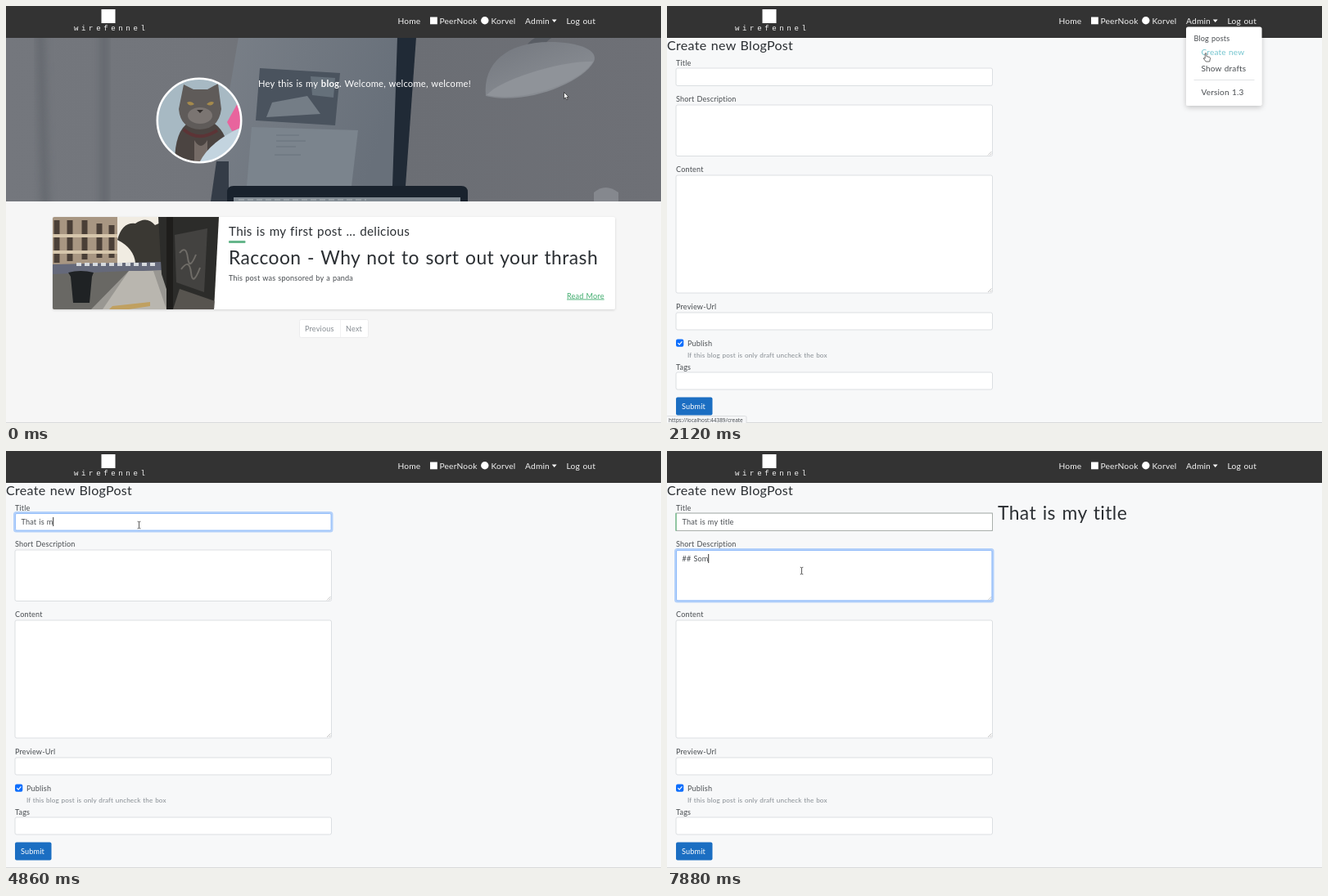
These frames come from a looping animation (800 px wide and 510 px high, 8 s). An HTML page:

```html
<!DOCTYPE html>
<html lang="en">
<head>
<meta charset="utf-8">
<title>Blog admin</title>
<style>
  html, body { margin: 0; width: 100%; height: 100%; overflow: hidden; background: #f7f8f9; }
  svg { display: block; width: 800px; height: 510px; }
  text { font: 9.1px Lato, sans-serif; letter-spacing: .019em; word-spacing: .06em; fill: #484c50; }
  .nav text { font-size: 10.2px; fill: #f4f4f4; }
  .nav .brand { font: 9px "Liberation Mono", monospace; letter-spacing: 3.65px; }
  .lead { font-size: 11.2px; fill: #fff; }
  .h1 { font-size: 22.8px; fill: #2b2f33; }
  .h3 { font-size: 16px; fill: #2b2f33; }
  .sub { font-size: 15.2px; fill: #2b2f33; }
  .item { font-size: 10px; }
  .muted { fill: #868c92; }
  .small { font-size: 8.1px; }
  .more { fill: #43ad70; text-decoration: underline; }
  .on { fill: #fff; }
  .url { font: 6.45px "Noto Sans", sans-serif; letter-spacing: 0; word-spacing: 0; }
  .field { fill: #fff; stroke: #d3d7db; stroke-width: .8; }
  .ring { fill: none; stroke: #b4d1fa; stroke-width: 3; }
  .focus { stroke: #86b5fa; stroke-width: .8; }
  .grip { stroke: #9a9a9a; stroke-width: .6; fill: none; }
</style>
</head>
<body>
<svg viewBox="0 0 800 510" xmlns="http://www.w3.org/2000/svg">
  <defs>
    <linearGradient id="wall">
      <stop offset="0" stop-color="#74777d"/><stop offset=".3" stop-color="#72757b"/>
      <stop offset=".6" stop-color="#6b6e74"/><stop offset="1" stop-color="#6e7076"/>
    </linearGradient>
    <linearGradient id="screen" x2="1" y2=".3">
      <stop offset="0" stop-color="#7a8088"/><stop offset="1" stop-color="#68707a"/>
    </linearGradient>
    <linearGradient id="shade" x2=".8" y2="1">
      <stop offset="0" stop-color="#73777e"/><stop offset="1" stop-color="#8d9197"/>
    </linearGradient>
    <filter id="soft" x="-20%" y="-20%" width="140%" height="150%">
      <feDropShadow dx="0" dy="2" stdDeviation="3" flood-opacity=".22"/>
    </filter>
    <filter id="faint" x="-5%" y="-10%" width="110%" height="125%">
      <feDropShadow dx="0" dy="1" stdDeviation="1.5" flood-opacity=".14"/>
    </filter>
    <filter id="blur"><feGaussianBlur stdDeviation="5"/></filter>
    <clipPath id="hero"><rect y="38" width="800" height="201"/></clipPath>
    <clipPath id="face"><circle cx="236" cy="140" r="51"/></clipPath>
    <clipPath id="slant"><path d="M59 258H260L254 371H59q-2 0-2-2V260q0-2 2-2z"/></clipPath>
  </defs>

  <g id="home">
    <rect width="800" height="510" fill="#f6f6f6"/>
    <g clip-path="url(#hero)">
      <rect y="38" width="800" height="201" fill="url(#wall)"/>
      <path d="M42 30L48 250M120 30V250" stroke="#575b62" stroke-width="10" opacity=".5" filter="url(#blur)"/>
      <path d="M284 38H480L472 239H250z" fill="url(#screen)"/>
      <path d="M257 190L250 239H272V190z" fill="#343c47"/>
      <path d="M478 38H501L488 220H472z" fill="#202a36"/>
      <path d="M310 76L408 82L402 146L305 140z" fill="#4a535e"/>
      <path d="M325 118L368 110L384 132L318 136z" fill="#747d86"/>
      <path d="M372 86l30 2-2 24-26-3z" fill="#65707a"/>
      <path d="M300 148L430 152L422 220H294z" fill="#7b848d"/>
      <path d="M330 158h28M330 165h36M330 172h24M328 182h32" stroke="#69737c"/>
      <path d="M648 38q-16 8-12 20h20q-2-12 12-20z" fill="#595d64"/>
      <path d="M586 110C582 70 612 44 664 44C700 44 724 54 718 68C704 94 634 122 586 110z" fill="url(#shade)"/>
      <path d="M587 109C602 90 680 66 717 68C704 92 634 119 587 109z" fill="#8f9399"/>
      <path d="M718 228q14-12 30 0v11h-30z" fill="#85888e"/>
      <path d="M270 239v-11q0-8 8-8H556q8 0 8 8v11z" fill="#19222d"/>
      <path d="M278 239v-5H555v5z" fill="#818a92"/>
      <path d="M284 237H440" stroke="#b2b8bc" stroke-dasharray="7 4"/>
    </g>
    <g clip-path="url(#face)">
      <rect x="184" y="88" width="104" height="104" fill="#a7b9c3"/>
      <path d="M206 192q0-40 18-50h28q22 14 20 50z" fill="#4b4441"/>
      <path d="M211 126L217 96L229 102H246L259 95L263 126Q260 150 237 151Q213 150 211 126z" fill="#5f5b59"/>
      <ellipse cx="237" cy="134" rx="15" ry="10" fill="#7b7572"/>
      <path d="M221 118q5-3 9 2q-6 4-9-2zM245 120q5-5 9-2q-3 6-9 2z" fill="#a58a4c"/>
      <path d="M233 127h8l-4 4z" fill="#35302e"/>
      <path d="M217 151q18 16 41 1" fill="none" stroke="#5c3436" stroke-width="4"/>
      <path d="M230 164q8 14 16 0v28h-16z" fill="#756b66"/>
      <path d="M290 106L270 142L276 153L290 150z" fill="#e8649d"/>
      <path d="M236 192Q248 166 288 148V192z" fill="#c3d4df"/>
    </g>
    <circle cx="236" cy="140" r="51.2" fill="none" stroke="#fff" stroke-width="2.6"/>
    <text class="lead" x="308" y="98.7">Hey this is my <tspan font-weight="700">blog</tspan>. Welcome, welcome, welcome!</text>

    <rect x="57" y="258" width="687" height="113" rx="2.5" fill="#fff" filter="url(#faint)"/>
    <g clip-path="url(#slant)">
      <rect x="57" y="258" width="204" height="113" fill="#f1ece2"/>
      <path d="M57 258H136V318H57z" fill="#a89682"/>
      <path d="M62 262v52M78 262v50M96 262v48M114 266v42M129 268v40" stroke="#4a3f37" stroke-width="7"/>
      <path d="M57 281H136M57 301H136" stroke="#d6c6ac" stroke-width="4"/>
      <path d="M136 286q6-22 22-20q14-10 24 2q14-8 22 8v38H158q-2-18-22-28z" fill="#3a3833"/>
      <path d="M57 318H204V371H57z" fill="#999792"/>
      <path d="M57 316L190 313V323L57 329z" fill="#65697a"/>
      <path d="M86 316H186" stroke="#d6d9dd" stroke-width="4" stroke-dasharray="6 4"/>
      <path d="M57 328L150 324L104 371H57z" fill="#696864"/>
      <path d="M150 324H180L196 371H118z" fill="#b9b6af"/>
      <path d="M186 258H262V371H204L190 328z" fill="#2c2c2a"/>
      <path d="M206 280L246 272L242 350L208 338z" fill="#434240"/>
      <path d="M212 302q8-10 10 6t10-4M214 322q10-14 12 4t11-6" fill="none" stroke="#6f6c67" stroke-width="2"/>
      <path d="M196 258h8v113h-8z" fill="#1e1d1b"/>
      <path d="M204 371L212 346L258 362V371z" fill="#57544f"/>
      <path d="M126 371l4-4L176 362v5L150 371z" fill="#c0a060"/>
      <path d="M76 326q15-4 31 0l-2 5-3 32H82l-3-32z" fill="#1f2224"/>
    </g>
    <text class="sub" x="272" y="280.5">This is my first post ... delicious</text>
    <rect x="272" y="287" width="20.5" height="3" rx="1" fill="#66b68b"/>
    <text class="h1" x="272" y="316">Raccoon - Why not to sort out your thrash</text>
    <text x="272" y="336">This post was sponsored by a panda</text>
    <text class="more" x="685" y="357.5">Read More</text>
    <rect x="358.5" y="383.5" width="84" height="22" rx="2" fill="#fff" stroke="#ececed"/>
    <path d="M408.5 384v21" stroke="#f1f2f3"/>
    <text class="muted" x="365" y="397.8">Previous</text>
    <text class="muted" x="415" y="397.8">Next</text>
  </g>

  <g id="form">
    <rect width="800" height="510" fill="#f7f8f9"/>
    <text class="h3" x="0" y="54">Create new BlogPost</text>
    <text x="11" y="72.5">Title</text>
    <text x="11" y="117">Short Description</text>
    <text x="11" y="203">Content</text>
    <text x="11" y="371">Preview-Url</text>
    <text x="11" y="444.5">Tags</text>
    <g id="fields"></g>
    <path class="grip" d="M392 182.5l4.5-4.5M394.5 182.5l2-2M392 350l4.5-4.5M394.5 350l2-2"/>
    <g id="valid" fill="none">
      <rect x="11" y="76" width="386.5" height="21.5" stroke="#a4aaa6" stroke-width=".9"/>
      <path d="M11 76v21.5" stroke="#58bd78"/>
    </g>
    <g id="ringTitle">
      <rect class="ring" x="10.5" y="75.5" width="387.5" height="22.5" rx="2"/>
      <rect class="focus" x="11.5" y="76.5" width="385.5" height="20.5" rx="1.5" fill="#fff"/>
    </g>
    <g id="ringShort">
      <rect class="ring" x="10.5" y="120.5" width="387.5" height="63.5" rx="2"/>
      <rect class="focus" x="11.5" y="121.5" width="385.5" height="61.5" rx="1.5" fill="none"/>
    </g>
    <text id="title" x="18.5" y="90"></text>
    <text id="short" x="18.5" y="135"></text>
    <path id="caret" d="M0 0v11" stroke="#222" stroke-width=".9"/>
    <text id="preview" class="h1" x="404" y="84">That is my title</text>
    <rect x="11" y="407.5" width="9.3" height="9.3" rx="2" fill="#0d6efd"/>
    <path d="M13.3 412.2l1.8 1.9 3.3-3.7" fill="none" stroke="#fff" stroke-width="1.2"/>
    <text x="25" y="415.5">Publish</text>
    <text class="small muted" x="25" y="429.5">If this blog post is only draft uncheck the box</text>
    <rect x="11" y="478.5" width="44.5" height="22" rx="2" fill="#1b6ec2"/>
    <text class="on" x="18" y="492.7">Submit</text>
  </g>

  <rect width="800" height="39" fill="#333"/>
  <g class="nav">
    <rect x="116.5" y="4" width="17" height="17" fill="#fff"/>
    <text class="brand" x="83" y="29.5">wirefennel</text>
    <text x="478.5" y="21.7">Home</text>
    <rect x="518" y="13.5" width="8.8" height="8.8" fill="#fff"/>
    <text x="529.5" y="21.7">PeerNook</text>
    <circle cx="584.8" cy="17.8" r="4.7" fill="#fff"/>
    <text x="592.5" y="21.7">Korvel</text>
    <text x="634" y="21.7">Admin</text>
    <path d="M666.8 16.5h5.8l-2.9 3.5z" fill="#fff"/>
    <text x="684.5" y="21.7">Log out</text>
  </g>

  <g id="menu">
    <rect x="634" y="25.5" width="92.5" height="96.5" rx="2.5" fill="#fff" filter="url(#soft)"/>
    <text x="643.5" y="42.5">Blog posts</text>
    <text id="create" class="item" x="652.5" y="59.5">Create new</text>
    <text class="item" x="652.5" y="79.5">Show drafts</text>
    <path d="M643.5 90.5h74" stroke="#e2e4e6"/>
    <text class="item" x="652.5" y="108.5">Version 1.3</text>
  </g>

  <path d="M0 509.5H800" stroke="#d9dadb"/>
  <g id="status">
    <rect id="bar" x="-1" y="501.5" height="10" rx="1.5" fill="#f5f6f7" stroke="#dcdee0"/>
    <text id="url" class="url" x="2" y="509.3"></text>
  </g>

  <circle id="glow" r="7" fill="#f5ee20" opacity=".8"/>
  <g id="cursor" stroke-linejoin="round">
    <path id="arrow" d="M0 0v8l1.9-1.7 1.3 2.9 1.4-.6-1.3-2.8h2.5z" fill="#fff" stroke="#222" stroke-width=".7"/>
    <path id="hand" d="M-.8 0q1-1 1.7 0v3.5l4 1.2q.8.4.6 1.5l-.8 3.8h-4.5l-3-4q.4-1.2 2 .2z" fill="#fff" stroke="#333" stroke-width=".7"/>
    <path id="beam" d="M-1.8-4.3q1.6 0 1.8.8q.2-.8 1.8-.8M0-3.5v7M-1.8 4.3q1.6 0 1.8-.8q.2.8 1.8.8" fill="none" stroke="#333" stroke-width=".8"/>
  </g>
</svg>
<script>
const LOOP = 8000;
const $ = id => document.getElementById(id);

// time, cursor shape, x, y, click glow
const moves = [
  [0, 'arrow', 681.5, 105.5], [260, 'arrow', 680, 98], [400, 'arrow', 672, 68],
  [550, 'arrow', 661, 36], [700, 'hand', 655, 18], [840, 'hand', 654, 15],
  [1250, 'arrow', 656, 38], [1400, 'hand', 658, 58], [1960, 'hand', 658, 58, 1],
  [2120, 'hand', 658, 58], [2390, 'arrow', 638, 64], [2530, 'arrow', 500, 76],
  [2680, 'beam', 320, 86], [2820, 'beam', 195, 90], [2960, 'beam', 162.5, 90.5],
  [3250, 'beam', 162.5, 90.5, 1], [3670, 'beam', 162.5, 90.5],
  [6150, 'beam', 163, 95], [6300, 'arrow', 164, 112],
  [6440, 'beam', 164.5, 146.5, 1], [6590, 'beam', 164.5, 146.5]
];
// time, number of typed characters
const titleKeys = [
  [0, 0], [3970, 1], [4110, 2], [4250, 3], [4400, 4], [4540, 6], [4690, 7],
  [4830, 9], [4970, 10], [5130, 12], [5270, 13], [5410, 14], [5550, 15], [5680, 16]
];
const shortKeys = [[0, 0], [7010, 1], [7170, 2], [7440, 3], [7590, 4], [7740, 5], [7880, 6]];

const at = (rows, t) => rows.findLast(r => r[0] <= t);
const show = (id, on) => $(id).setAttribute('visibility', on ? 'inherit' : 'hidden');
const place = (id, x, y) => $(id).setAttribute('transform', `translate(${x} ${y})`);
const write = (id, s) => { if ($(id).textContent !== s) $(id).textContent = s; };
const typed = (s, n) => s.slice(0, n).replace(/ $/, '\u00a0');

$('fields').innerHTML = [[76, 21.5], [121, 62.5], [207, 144], [375, 21], [448, 21]]
  .map(([y, h]) => `<rect class="field" x="11" y="${y}" width="386.5" height="${h}" rx="2"/>`).join('');

function draw(t) {
  const form = t >= 2120, blurred = t >= 6440;
  show('home', !form);
  show('form', form);
  show('menu', t >= 700 && t < 2530);
  $('create').style.fill = t >= 1400 && t < 2390 ? '#74c5cf' : '';

  show('status', t >= 700 && t < 2530);
  write('url', 'https://localhost:44389/' + (t < 1400 ? '#' : 'create'));
  $('bar').setAttribute('width', t < 1400 ? 83 : 98);

  show('ringTitle', form && t >= 3250 && !blurred);
  $('ringTitle').setAttribute('opacity', t < 3400 ? .5 : 1);
  show('ringShort', blurred);
  $('ringShort').setAttribute('opacity', t < 6590 ? .6 : 1);
  show('valid', blurred);
  show('preview', blurred);
  write('title', typed('That is my title', at(titleKeys, t)[1]));
  write('short', typed('## Som', at(shortKeys, t)[1]));

  const box = $(blurred ? 'short' : 'title');
  show('caret', form && t >= 3250);
  place('caret', 18.7 + (box.textContent ? box.getComputedTextLength() : 0), blurred ? 126 : 81);

  const [, shape, x, y, click] = at(moves, t);
  for (const id of ['arrow', 'hand', 'beam']) show(id, id === shape);
  place('cursor', x, y);
  show('glow', click);
  place('glow', x, y);
}

const start = performance.now();
function tick() {
  draw((performance.now() - start) % LOOP);
  requestAnimationFrame(tick);
}
tick();
</script>
</body>
</html>
```
